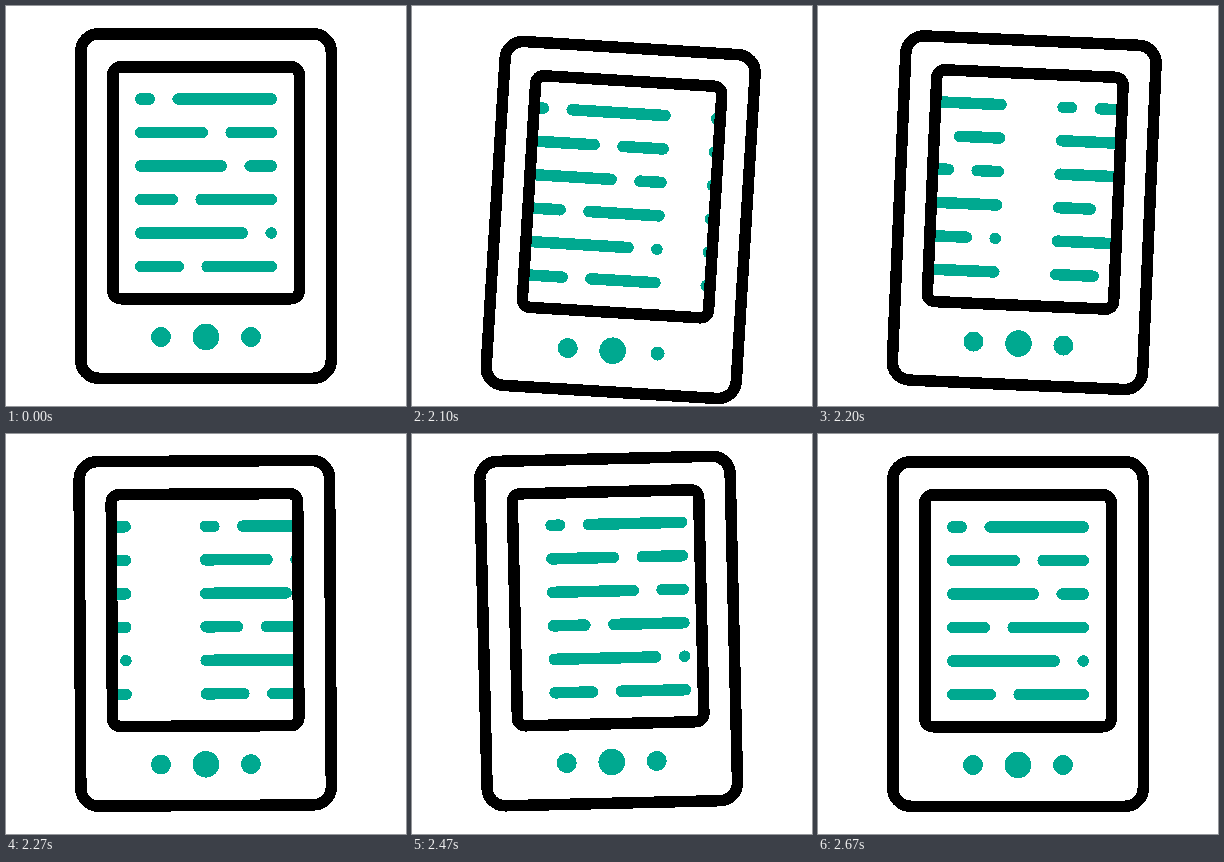
Animation, 400 px wide and 400 px high, one loop 2.7 s. Source, as an HTML page:

```html
<!DOCTYPE html>
<html lang="en">
<head>
<meta charset="utf-8">
<title>E-reader page turn</title>
<style>
  html, body { margin: 0; width: 100%; height: 100%; overflow: hidden; background: #fff; }
  svg { display: block; width: 100%; height: 100%; shape-rendering: crispEdges; }
  .frame { fill: none; stroke: #000; stroke-width: 11.5; }
  .line { stroke: #00a990; stroke-width: 11.5; stroke-linecap: round; }
  .dot { fill: #00a990; }
</style>
</head>
<body>
<svg viewBox="0 0 400 400">
  <defs>
    <clipPath id="screen"><rect x="109" y="63" width="182" height="228"/></clipPath>
  </defs>
  <g id="device">
    <g clip-path="url(#screen)">
      <g id="oldPage"></g>
      <g id="newPage"></g>
    </g>
    <rect class="frame" x="74.75" y="27.75" width="250.5" height="344.5" rx="18"/>
    <rect class="frame" x="106.75" y="60.75" width="186.5" height="232" rx="8"/>
    <circle class="dot" cx="155" cy="331" r="10"/>
    <circle class="dot" cx="200" cy="331" r="13.3"/>
    <circle class="dot" id="button" cx="245" cy="331" r="10"/>
  </g>
</svg>
<script>
  const LOOP = 2700, HOLD = 2000, STEP = 25;
  const SWING_BACK = 14.3, REST = 27;   // in steps
  const LEFT = 129, RIGHT = 271, CAP = 5.75, GAP = 17.4;
  const FIRST_ROW = 93, ROW_PITCH = 33.5;
  const GAP_STARTS = [149, 202, 221, 172, 242, 178];

  const $ = id => document.getElementById(id);
  const device = $("device"), button = $("button");
  const oldPage = $("oldPage"), newPage = $("newPage");

  function dash(x1, x2, y) {
    const from = x1 + CAP, to = Math.max(x2 - CAP, from + .01);
    return `<path class="line" d="M${from} ${y}H${to}"/>`;
  }

  oldPage.innerHTML = newPage.innerHTML = GAP_STARTS.map((x, i) => {
    const y = FIRST_ROW + i * ROW_PITCH;
    return dash(LEFT, x, y) + dash(x + GAP, RIGHT, y);
  }).join("");

  // Sine ease from 0 to 1 between steps a and b.
  function ease(k, a, b) {
    const u = Math.min(1, Math.max(0, (k - a) / (b - a)));
    return (1 - Math.cos(Math.PI * u)) / 2;
  }

  // Rise to high at step peak, swing back to low, then settle at 0.
  function swing(k, peak, high, low) {
    return high * ease(k, 0, peak)
      + (low - high) * ease(k, peak, SWING_BACK)
      - low * ease(k, SWING_BACK, REST);
  }

  function draw(ms) {
    // Steps start on whole hundredths of a second.
    const tick = Math.floor(ms / 10) * 10 + 5;
    const k = Math.max(0, Math.floor((tick - HOLD) / STEP));
    const tilt = swing(k, 5, 3.87, -1.95);
    const drop = swing(k, 3, 14.1, -4.3);
    const press = ease(k, 0, 2) - ease(k, 2, 8);
    const pageOut = -186 * ease(k, 0, 16);
    const pageIn = 222 * Math.max(0, 1 - k / 24.2) ** 2;

    device.setAttribute("transform", `translate(0 ${drop}) rotate(${tilt} 200 342)`);
    oldPage.setAttribute("transform", `translate(${pageOut})`);
    newPage.setAttribute("transform", `translate(${pageIn})`);
    button.setAttribute("r", 10 - 4 * press);
  }

  const start = performance.now();
  function loop() {
    draw((performance.now() - start) % LOOP);
    requestAnimationFrame(loop);
  }
  loop();
</script>
</body>
</html>
```
